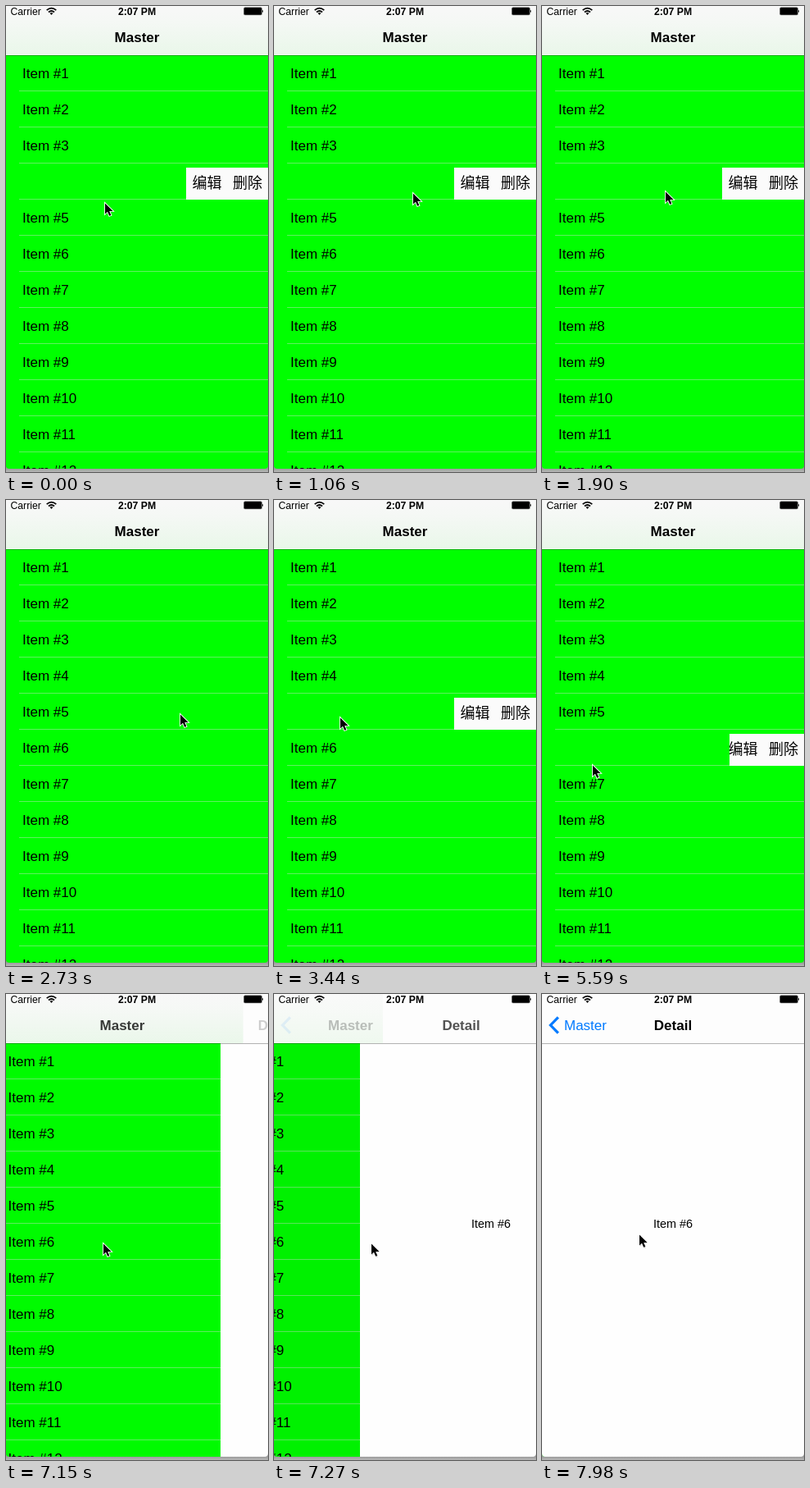
An HTML page for the animation above (8 s loop, 320 by 568 pixels).

```html
<!DOCTYPE html>
<html lang="zh-CN">
<head>
<meta charset="utf-8">
<title>Swipe list</title>
<style>
  html, body { margin: 0; width: 100%; height: 100%; overflow: hidden; background: #fff; }
  svg { display: block; width: 320px; height: 568px; }
  text { font-family: "Liberation Sans", Arial, sans-serif; font-size: 17px; }
  .bold { font-weight: bold; }
  .mid { text-anchor: middle; }
  .status { font-size: 12.2px; }
  .menu text { font-family: "Noto Sans CJK SC", "Noto Sans CJK", sans-serif; font-size: 18px; font-weight: 300; }
</style>
</head>
<body>
<svg viewBox="0 0 320 568" xmlns="http://www.w3.org/2000/svg">
  <defs>
    <linearGradient id="barTint" x1="0" y1="0" x2="0" y2="1">
      <stop offset="0" stop-color="#f8f8f8"/>
      <stop offset=".3" stop-color="#f5f8f5"/>
      <stop offset="1" stop-color="#e9f7e9"/>
    </linearGradient>
    <linearGradient id="floor" x1="0" y1="0" x2="0" y2="1">
      <stop offset="0" stop-color="#7f7f7f"/>
      <stop offset="1" stop-color="#b8b8b8"/>
    </linearGradient>
    <clipPath id="screen"><path d="M0 0H320V560Q320 564 316 564H4Q0 564 0 560Z"/></clipPath>
    <clipPath id="menuClip"><rect id="menuWindow" y="5" width="100" height="39"/></clipPath>
  </defs>

  <rect y="560" width="320" height="8" fill="url(#floor)"/>
  <g clip-path="url(#screen)">
    <g id="list">
      <rect y="60" width="320" height="508" fill="#0f0"/>
      <g id="rows"></g>
      <g id="menu" class="menu">
        <g clip-path="url(#menuClip)">
          <rect x="220" y="5" width="100" height="39" fill="#fbfbfb"/>
          <text class="mid" x="245.5" y="30">编辑</text>
          <text class="mid" x="295" y="30">删除</text>
        </g>
      </g>
      <rect id="dim" y="60" width="320" height="508" opacity="0"/>
    </g>
    <g id="detail">
      <rect y="60" width="320" height="508" fill="#fefefe"/>
      <text class="mid" x="160" y="285" style="font-size:14.4px">Item #6</text>
    </g>

    <rect width="320" height="60" fill="#fdfdfd"/>
    <rect id="tint" width="320" height="60" fill="url(#barTint)"/>
    <rect y="60" width="320" height="1" opacity=".3"/>
    <text id="masterTitle" class="bold mid" y="44">Master</text>
    <text id="detailTitle" class="bold mid" y="44">Detail</text>
    <path id="chevron" d="M19.8 28.4 10.4 38 19.8 47.6" fill="none" stroke="#007aff" stroke-width="3.2"/>
    <text id="backLabel" y="44" fill="#007aff">Master</text>

    <text class="status" x="5.5" y="11">Carrier</text>
    <g fill="none" stroke="#000" stroke-width="1.7">
      <path d="M49.7 5.1Q55.5 0 61.3 5.1M52 7.5Q55.5 4.5 59 7.5"/>
      <path d="M53.6 8.8Q55.5 7.2 57.4 8.8L55.5 10.9Z" fill="#000" stroke="none"/>
    </g>
    <text class="status bold mid" x="160" y="11">2:07 PM</text>
    <rect x="290.5" y="1.7" width="22" height="9.2" rx="1.5" fill="#000" stroke="#777" stroke-width=".6"/>
    <path d="M313 4.5Q315 6.3 313 8.2Z"/>
  </g>

  <g id="cursor">
    <path d="M1 1.5V14.5L4 11.7 6.2 16.8 8.4 15.9 6.2 10.9H10.6Z" transform="translate(.8 1.2)" opacity=".25"/>
    <path d="M1 1.5V14.5L4 11.7 6.2 16.8 8.4 15.9 6.2 10.9H10.6Z" stroke="#fff" stroke-width="1.8" paint-order="stroke"/>
  </g>
</svg>

<script>
const LOOP = 8000, STEP = 119, SLACK = 12;
const ROW = 44, LIST_TOP = 60, MENU_WIDTH = 100;
const PUSH_START = 7150, PUSH_STEPS = 6;
const $ = id => document.getElementById(id);
const set = (el, attrs) => { for (const k in attrs) el.setAttribute(k, attrs[k]); };
const shift = (el, x, y = 0) => set(el, { transform: `translate(${x} ${y})` });

// The screen refreshes in coarse steps.
const stepsSince = (t, start) => Math.floor((t - start + SLACK) / STEP);
const latest = (list, t) => list.reduce((found, item) => item.at <= t ? item : found);

const swipes = [
  { row: 3, at: -1000, release: 2130, closed: 2130 },
  { row: 4, at: 2960, release: 4160, closed: 4280 },
  { row: 5, at: 5240, release: 6310, closed: 6430 }
];

function swipeOffset({ at, release, closed }, t) {
  if (t >= closed) return 0;
  if (t >= release) return 0.8 * MENU_WIDTH;
  return Math.min(MENU_WIDTH, 22.8 * (stepsSince(t, at) + 1));
}

const moves = [{ at: 0, steps: 1, x: 120, y: 239 }];
function moveTo(at, steps, x, y) {
  moves.push({ at, steps, x, y, from: moves.at(-1) });
}
// A swipe pulls left past the menu's width, then the hand drifts back.
function drag({ at }) {
  const { x, y } = moves.at(-1);
  moveTo(at, 4, x - 140, y + 8);
  moveTo(at + 4 * STEP, 3, x - 110, y - 6);
}
moveTo(120, 9, 169, 227);
moveTo(1420, 2, 150, 225);
moveTo(2370, 4, 212, 260);
drag(swipes[1]);
moveTo(4520, 5, 201, 314);
drag(swipes[2]);
moveTo(6070, 1, 118, 303);
moveTo(7980, 1, 118, 292);

function cursorAt(t) {
  const { at, steps, x, y, from = moves[0] } = latest(moves, t);
  const p = Math.min(1, (stepsSince(t, at) + 1) / steps) ** 1.2;
  const mix = (a, b) => Math.round(a + (b - a) * p);
  return [mix(from.x, x), mix(from.y, y)];
}

// Critically damped spring.
function pushProgress(t) {
  if (t < PUSH_START) return 0;
  const k = stepsSince(t, PUSH_START);
  if (k >= PUSH_STEPS - 1) return 1;
  const x = 12.92 * (0.06 + k * STEP / 1000);
  return 1 - (1 + x) * Math.exp(-x);
}

$('rows').innerHTML = Array.from({ length: 12 }, (_, i) => {
  const top = LIST_TOP + i * ROW;
  return `<rect x="16" y="${top + 43}" width="304" height="1" fill="#60f060"/>
    <text x="20" y="${top + 28}">Item #${i + 1}</text>`;
}).join('');
const labels = $('rows').querySelectorAll('text');

function drawList(t) {
  const swipe = latest(swipes, t), offset = swipeOffset(swipe, t);
  labels.forEach((label, i) => set(label, { x: 20 - (i === swipe.row ? offset : 0) }));
  shift($('menu'), 0, LIST_TOP + swipe.row * ROW);
  set($('menuWindow'), { x: 320 - Math.round(offset), width: offset });
}

function drawPush(p) {
  const rest = 1 - p;
  shift($('list'), -96 * p);
  shift($('detail'), Math.round(320 * rest));
  set($('dim'), { opacity: 0.08 * p });
  set($('tint'), { width: p < 1 ? Math.min(320, 320 * rest + 28) : 0, opacity: rest ** 0.3 });
  set($('masterTitle'), { x: 160 - 99 * p, opacity: rest ** 1.3 });
  set($('detailTitle'), { x: 160 + 209 * rest, opacity: p });
  set($('chevron'), { opacity: p ** 6 });
  set($('backLabel'), { x: 27 + 99 * rest, opacity: Math.max(0, (p - 0.7) / 0.3) });
}

function tick() {
  const t = performance.now() % LOOP;
  drawList(t);
  drawPush(pushProgress(t));
  shift($('cursor'), ...cursorAt(t));
  requestAnimationFrame(tick);
}
tick();
</script>
</body>
</html>
```
